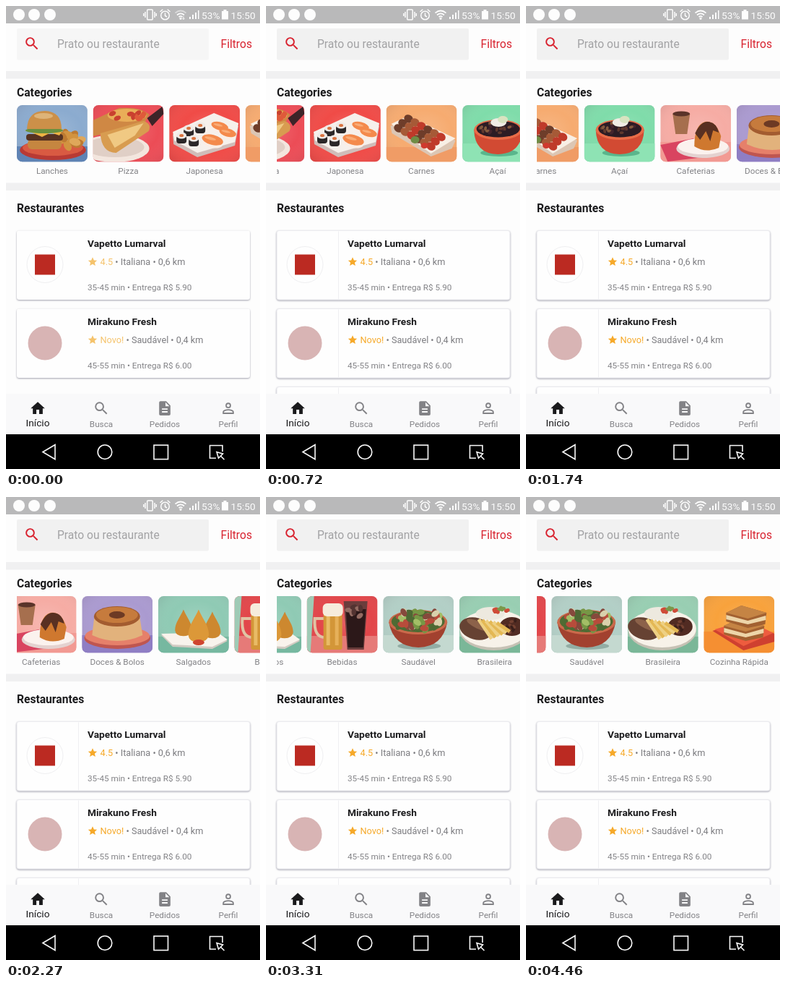
These frames come from a looping animation (352 px wide and 640 px high, 4.61 s). An HTML page:

```html
<!DOCTYPE html>
<html lang="pt-BR">
<head>
<meta charset="utf-8">
<title>Restaurantes</title>
<style>
  html, body { margin: 0; width: 100%; height: 100%; overflow: hidden; background: #fdfdfd; }
  #stage { display: block; width: 100vw; height: 100vh; font-family: Roboto, "Noto Sans", sans-serif; }
  .h { font-size: 15.64px; font-weight: 700; fill: #1c1c1e; }
  .name { font-size: 13.69px; font-weight: 700; fill: #1c1c1e; }
  .info { font-size: 12.71px; fill: #7c7c80; }
  .small { font-size: 11.73px; fill: #828286; }
  .mid { text-anchor: middle; }
  .gold { fill: #f6a92a; }
  .field { fill: #f1f1f1; }
  .band { fill: #f0f0f1; }
  .card { fill: #fefefe; stroke: #ebebef; filter: drop-shadow(0 1.5px 1px rgba(70, 70, 95, .5)); }
  .rule { stroke: #efeff1; }
  .pale .field { fill: #f6f6f6; }
  .pale .card { stroke: none; }
  .pale .rule, .pale .third { display: none; }
  .pale .gold { fill: #f5c36c; }
</style>
</head>
<body>
<svg id="stage" viewBox="0 0 352 640" preserveAspectRatio="none">
  <defs>
    <clipPath id="round"><rect width="97.8" height="78.3" rx="7.5"/></clipPath>
    <radialGradient id="glow" cx=".55" cy=".45" r=".75">
      <stop offset="0" stop-color="#fff" stop-opacity=".14"/>
      <stop offset=".5" stop-color="#fff" stop-opacity="0"/>
      <stop offset="1" stop-color="#301020" stop-opacity=".12"/>
    </radialGradient>
    <g id="lens" fill="none" stroke-width="2">
      <circle cx="9.5" cy="9.5" r="5.5"/><path d="M14 14l5.800 5.800"/>
    </g>
  </defs>
  <rect width="352" height="640" fill="#fdfdfd"/>

  <g id="status">
    <rect width="352" height="24" fill="#b9b9ba"/>
    <g fill="#fdfdfd">
      <circle cx="18" cy="12" r="8"/><circle cx="39" cy="12" r="8"/><circle cx="61" cy="12" r="8"/>
      <path d="M254 18v-3h2v3zm4 0v-6h2v6zm4 0v-9h2v9zm4 0V6h1.500v12z"/>
      <path d="M299 7h2.500V5h4v2h2.500v11.500h-9z"/>
      <g font-size="13.69"><text x="271" y="17.500">53%</text><text x="311.500" y="17.500">15:50</text></g>
    </g>
    <g fill="none" stroke="#fdfdfd" stroke-width="1.500">
      <rect x="195.700" y="5" width="7.500" height="14" rx="1"/>
      <path d="M193 8v8M206 8v8M190.800 10v4M208.200 10v4"/>
      <circle cx="220.500" cy="13" r="5.800"/>
      <path d="M220.500 9.500v4l2.500 1.500M213.500 8l3.800-3.200M227.500 8l-3.800-3.200"/>
    </g>
    <g id="wifi" fill="none" stroke="#fdfdfd" stroke-width="1.700">
      <path id="arc" d="M234.500 9.700q7.500-6.400 15 0"/>
      <path d="M237 12.500q5-4.200 10 0M239.500 15.200q2.500-2.200 5 0"/>
      <circle cx="242" cy="17.300" r=".8"/>
      <path id="traffic" d="M246 14.500v4m-1.500-1.500l1.500 1.500l1.500-1.500" stroke-width="1"/>
    </g>
  </g>

  <rect class="field" x="15" y="31" width="266" height="43.500" rx="2"/>
  <use href="#lens" transform="translate(24.200 40.200) scale(.978)" stroke="#d8222f"/>
  <text x="71" y="57.500" font-size="15.64" fill="#a2a2a4">Prato ou restaurante</text>
  <text x="297.500" y="57.500" font-size="15.64" fill="#d8222f">Filtros</text>
  <rect class="band" y="90" width="352" height="10.500"/>
  <text class="h" x="15" y="125">Categories</text>
  <svg x="15" y="137" width="337" height="104" overflow="hidden"><g id="track"></g></svg>
  <rect class="band" y="244.500" width="352" height="10.500"/>
  <text class="h" x="15" y="285">Restaurantes</text>
  <g id="list"></g>

  <rect y="536" width="352" height="56" fill="#f9f9fa"/>
  <g id="tabs"></g>

  <rect y="592" width="352" height="48" fill="#000"/>
  <g fill="none" stroke="#fafafa" stroke-width="1.600">
    <path d="M51 616.500L68 606.500V626.500Z"/>
    <circle cx="137" cy="616.500" r="9.800"/>
    <rect x="205" y="607" width="19.500" height="19.500"/>
    <path d="M300 616V607.500H282.500V625H291M292 616.500L300.500 619L294.500 625ZM297 621.500L302.500 627"/>
  </g>
</svg>
<script>
const $ = id => document.getElementById(id);
const E = (x, y, rx, ry, fill, turn = 0) =>
  `<ellipse cx="${x}" cy="${y}" rx="${rx}" ry="${ry}" fill="${fill}" transform="rotate(${turn} ${x} ${y})"/>`;
const P = (d, fill) => `<path d="${d}" fill="${fill}"/>`;
const R = (x, y, w, h, fill, r = 0) =>
  `<rect x="${x}" y="${y}" width="${w}" height="${h}" rx="${r}" fill="${fill}"/>`;

// seeded scatter of small ellipses inside an oval
function scatter(n, x, y, rx, ry, size, colors) {
  let seed = n * 7 + x, out = '';
  const rnd = () => (seed = (seed * 16807 + 11) % 2147483647) / 2147483647;
  for (let i = 0; i < 9; i++) rnd();
  for (let i = 0; i < n; i++) {
    const a = rnd() * 6.283, d = Math.sqrt(rnd());
    out += E((x + rx * d * Math.cos(a)).toFixed(1), (y + ry * d * Math.sin(a)).toFixed(1),
      size, size * .65, colors[i % colors.length], Math.round(rnd() * 180));
  }
  return out;
}

const roll = (x, y) => R(x - 7, y - 3, 14, 11, '#2b2728', 4) + E(x, y - 3, 7, 4.5, '#efeae6') + E(x, y - 3, 3, 2, '#d9733f');
const salmon = (x, y, s) => E(x, y + 5 * s, 14 * s, 6 * s, '#fbeee6', 10) + E(x, y, 15 * s, 7 * s, '#f48a4c', 14) +
  E(x - 3 * s, y - 2 * s, 8 * s, 2 * s, '#f9ad78', 14);
const drop = (x, y, s) => P(`M${x} ${y - 24 * s}C${x + 5 * s} ${y - 12 * s} ${x + 13 * s} ${y - 4 * s} ${x + 13 * s} ${y + 8 * s}` +
  `Q${x + 11 * s} ${y + 17 * s} ${x} ${y + 17 * s}Q${x - 12 * s} ${y + 17 * s} ${x - 13 * s} ${y + 8 * s}` +
  `C${x - 13 * s} ${y - 4 * s} ${x - 5 * s} ${y - 12 * s} ${x} ${y - 24 * s}Z`, s < 1 ? '#cd882f' : '#dc9838');
const skewer = (x, y) => {
  let out = '';
  for (let i = 0; i < 6; i++)
    out += E(x + i * 9, y + i * 5, 6.5, 5.5, ['#6e3d2a', '#a65a37', '#bf3a2a'][i % 3], 30);
  return out;
};

const meals = [
  ['Lanches', '#8babcf', () => R(0, 57, 98, 22, '#5f83b4') + E(50, 62, 46, 14, '#b83a34') + E(50, 59, 42, 11, '#d95a42') +
    scatter(14, 74, 48, 14, 9, 8, ['#d29340', '#bd7a32', '#dfa75a']) +
    R(15, 47, 47, 14, '#c58640', 6) + R(13, 40, 51, 9, '#573322', 4) + P('M11 35L64 33L59 42L47 38L35 44L21 38Z', '#eeb444') +
    E(38, 35, 26, 4, '#69903f') + P('M14 33Q15 8 39 8Q62 9 62 33Z', '#cc9049') + E(37, 15, 13, 4, '#deb478')],
  ['Pizza', '#ec4c56', () => E(30, 60, 48, 19, '#f3e6de') + E(30, 58, 41, 14, '#e0cfc6') +
    P('M0 21L36 4Q66 2 78 13L70 27L0 43Z', '#cf8844') + E(47, 14, 27, 9, '#e9ad58') +
    scatter(10, 47, 15, 24, 7, 5, ['#c9402f', '#df5a3a']) +
    P('M10 39L70 22Q82 26 77 36L32 66Q12 66 10 39Z', '#d89c50') + P('M20 41L70 25L58 42L30 59Z', '#f0c983') +
    P('M75 18L96 2L98 12L82 29Z', '#3d2428')],
  ['Japonesa', '#f04b47', () => P('M5 41L62 15L96 29L91 56L39 72L6 54Z', '#d0bdb9') + P('M5 37L62 11L96 25L91 51L39 66L7 49Z', '#f6f0eb') +
    roll(27, 35) + roll(43, 31) + roll(17, 45) + roll(34, 49) + salmon(70, 29, .8) + salmon(81, 38, .8) + salmon(60, 48, 1)],
  ['Carnes', '#f6ab70', () => R(0, 58, 98, 21, '#f09c66') + P('M6 29L30 17L96 49L91 60L62 71L8 39Z', '#dcc6b4') + P('M7 26L30 15L96 46L62 67Z', '#f8efe5') +
    skewer(31, 19) + skewer(23, 25) + skewer(17, 32) + E(40, 48, 6, 5, '#6f8c45') + E(53, 56, 5, 4, '#cf3a2e')],
  ['Açaí', '#7fdcaa', () => R(0, 53, 98, 26, '#8ee3b4') + E(51, 66, 26, 5, '#5ab68c') +
    P('M16 34Q17 67 49 68Q82 67 83 34Z', '#d24a33') + E(49.5, 34, 33.5, 14, '#e86c48') + E(49.5, 33, 30, 11.5, '#2c1c24') +
    scatter(22, 47, 32, 24, 7, 3, ['#60392e', '#84593d', '#44252d']) + E(50, 24, 11, 6, '#f0ece4') + E(56, 20, 7, 5, '#d8e3c0')],
  ['Cafeterias', '#f6aca4', () => R(0, 51, 98, 28, '#f29a93') + P('M0 55L46 46L60 72L10 78Z', '#d94460') + E(59, 60, 37, 13, '#e4d2d0') + E(59, 57, 35, 11, '#fbf2ee') +
    P('M17 12H41L37 40H21Z', '#a66f4e') + E(29, 12, 12, 3.5, '#5a3329') +
    P('M47 57Q47 27 62 23Q77 21 84 43L81 59Q63 67 47 57Z', '#cf782f') + P('M48 39Q56 22 66 23Q78 24 81 38L73 35L69 50L63 36L55 48Z', '#593022')],
  ['Doces & Bolos', '#aa9ad0', () => R(0, 54, 98, 25, '#8f7ec4') + E(49, 58, 46, 15, '#bf5650') + E(49, 55, 45, 13, '#e6806a') +
    P('M17 29L14 54Q49 70 84 54L80 29Z', '#e2b27c') + E(48.5, 28, 32, 14, '#a35c30') + E(48.5, 26, 29, 11, '#c67b3d') + E(48.5, 26, 11, 5, '#6d3a24')],
  ['Salgados', '#8fcab4', () => R(0, 56, 98, 23, '#76b8a0') + P('M4 54L82 52L96 62L75 73L20 70Z', '#d2cbc2') + P('M4 52L82 50L96 60L75 70L20 67Z', '#f8f3ec') +
    drop(35, 40, .9) + drop(75, 43, .9) + drop(56, 45, 1.1) + E(56, 64, 8, 4, '#cf442f')],
  ['Bebidas', '#e2464a', () => R(0, 55, 98, 24, '#e67a78') + P('M0 0H10L5 78H0Z', '#9fcbb6') +
    '<path d="M26 31H11Q9 58 26 57" fill="none" stroke="#e0c3a4" stroke-width="4"/>' +
    R(23, 21, 26, 53, '#d39638', 3) + R(27, 28, 5, 40, '#e9bb66') + R(39, 28, 5, 40, '#e6b05a') + R(22, 10, 28, 18, '#f6ecdc', 6) +
    P('M51 7H84L79 74H56Z', '#6b3d3c') + P('M54 18H82L78 71H57Z', '#2c1819') + scatter(8, 68, 21, 11, 8, 5, ['#946b62', '#533331'])],
  ['Saudável', '#b2cfc6', () => R(0, 54, 98, 25, '#c4d9d0') + E(50, 69, 30, 5, '#92ada4') + P('M8 36Q14 70 49 71Q83 70 89 36Z', '#a2412f') +
    E(48.5, 36, 40.5, 17, '#cb6a4b') + E(48.5, 35, 37, 15, '#4f6b33') +
    scatter(42, 48, 33, 33, 14, 6, ['#769745', '#a3be66', '#d9d1ac', '#4d6934', '#b84c3b', '#86493c'])],
  ['Brasileira', '#98ceb2', () => R(0, 56, 98, 23, '#7ab798') + E(48, 48, 47, 27, '#c6c1b4') + E(48, 45, 47, 26, '#f7f2e9') +
    E(43, 24, 20, 9, '#ede9df') + scatter(7, 57, 20, 10, 4, 4, ['#cf4b37', '#7a994a']) + E(73, 42, 17, 13, '#512b22') +
    scatter(12, 73, 42, 13, 9, 3, ['#734131', '#3a1f1a']) + E(23, 45, 23, 15, '#664233', 15) + E(26, 40, 17, 5, '#8c624a', 25) +
    [0, 1, 2, 3, 4, 5].map(i => `<path d="M${27 + i * 5} ${32 + i}L${45 + i * 5} ${59 - i * 2}" stroke="${i % 2 ? '#e4b854' : '#eed083'}" stroke-width="5"/>`).join('')],
  ['Cozinha Rápida', '#f8a23c', () => R(0, 49, 98, 30, '#f58f32') + P('M12 48L59 34L98 52V63L55 75Z', '#cf4030') + P('M15 46L60 33L96 51L55 69Z', '#ee5c3e') +
    [[28, 41], [31, 23]].map(([x, y]) => P(`M${x} ${y}L${x + 21} ${y - 10}L${x + 56} ${y}L${x + 54} ${y + 16}L${x + 30} ${y + 21}L${x} ${y + 12}Z`, '#a26131') +
      P(`M${x} ${y + 3}L${x + 30} ${y + 11}L${x + 55} ${y + 4}V${y + 10}L${x + 30} ${y + 16}L${x} ${y + 9}Z`, '#edd5a8') +
      P(`M${x} ${y}L${x + 21} ${y - 10}L${x + 56} ${y}L${x + 30} ${y + 8}Z`, '#c58444')).join('')]
];

const pitch = 105.6;
$('track').innerHTML = meals.map(([label, back, draw], i) => `<g transform="translate(${i * pitch} 0)">
  <g clip-path="url(#round)">${R(0, 0, 98, 79, back)}${R(0, 0, 98, 79, 'url(#glow)')}${draw()}</g>
  <text class="small mid" x="48.900" y="94.500">${label}</text></g>`).join('');

const star = 'M0-6.200L1.900-2L6.200-1.700L2.900 1.200L3.900 5.600L0 3.200L-3.900 5.600L-2.900 1.200L-6.200-1.700L-1.900-2Z';
const places = [
  ['Vapetto Lumarval', '4.5', 'Italiana • 0,6 km', '35-45 min • Entrega R$ 5.90',
    '<circle cx="39" cy="47" r="25" fill="none" stroke="#efeff1"/>' + R(25, 33, 28, 28, '#bb2a22')],
  ['Mirakuno Fresh', 'Novo!', 'Saudável • 0,4 km', '45-55 min • Entrega R$ 6.00', E(39, 47.5, 23.5, 23.5, '#d8b4b4')]
];
const shell = '<rect class="card" width="323" height="95.500" rx="3"/><path class="rule" d="M85.500 1V95"/>';
$('list').innerHTML = places.map(([name, score, kind, fee, mark], i) => `<g transform="translate(15 ${310.5 + i * 108})">
  ${shell}${mark}<text class="name" x="98" y="22">${name}</text>
  <path class="gold" d="${star}" transform="translate(105 43)"/>
  <text class="info" x="115.500" y="47"><tspan class="gold">${score}</tspan> • ${kind}</text>
  <text class="small" x="98" y="82">${fee}</text></g>`).join('') +
  `<g class="third" transform="translate(15 526.500)">${shell}</g>`;

const gray = '#828286';
const tabs = [
  ['Início', '<path d="M10 20v-6h4v6h5v-8h3L12 3 2 12h3v8z"/>'],
  ['Busca', `<use href="#lens" stroke="${gray}"/>`],
  ['Pedidos', '<path fill-rule="evenodd" d="M14 2H6c-1.100 0-2 .9-2 2v16c0 1.100.9 2 2 2h12c1.100 0 2-.9 2-2V8l-6-6zm2 16H8v-2h8v2zm0-4H8v-2h8v2zm-3-5V3.500L18.500 9H13z"/>'],
  ['Perfil', `<g fill="none" stroke="${gray}" stroke-width="1.900"><circle cx="12" cy="8" r="3"/><path d="M5 19v-2c0-2 4.500-3 7-3s7 1 7 3v2z"/></g>`]
];
$('tabs').innerHTML = tabs.map(([label, icon], i) => {
  const x = 44 + i * 88, on = i === 0;
  return `<g fill="${on ? '#1a1a1c' : gray}"><g transform="translate(${x - 11.7} 544.400) scale(.978)">${icon}</g>
    <text class="mid" x="${x}" y="${on ? 581 : 582}" font-size="${on ? 13.69 : 11.73}">${label}</text></g>`;
}).join('');

// scroll offset over time, joined by a monotone cubic
const loop = 4610;
const path = [[0, 0], [720, 165], [1340, 288.7], [1740, 356.5], [2670, 681], [3310, 803], [4190, 930.2]];
const speed = path.slice(1).map(([t, x], i) => (x - path[i][1]) / (t - path[i][0]));
const slope = path.map((_, i) => i && i < speed.length ? 2 * speed[i - 1] * speed[i] / (speed[i - 1] + speed[i]) : 0);

function scrollAt(t) {
  const i = path.findIndex(p => p[0] > t) - 1;
  if (i < 0) return path[path.length - 1][1];
  const [t0, a] = path[i], [t1, b] = path[i + 1];
  const d = t1 - t0, u = (t - t0) / d, v = 1 - u;
  return a * v * v * (1 + 2 * u) + b * u * u * (3 - 2 * u) + d * u * v * (slope[i] * v - slope[i + 1] * u);
}

const busy = [[0, 600], [2400, 2750], [3600, 4460]];
function render(t) {
  $('track').setAttribute('transform', `translate(${-scrollAt(t).toFixed(2)} 0)`);
  const active = busy.some(([a, b]) => t >= a && t < b);
  $('traffic').setAttribute('visibility', active ? 'visible' : 'hidden');
  $('arc').setAttribute('opacity', active ? .5 : 1);
  $('stage').classList.toggle('pale', t < 20);
}

const start = performance.now();
function tick() {
  render((performance.now() - start) % loop);
  requestAnimationFrame(tick);
}
tick();
</script>
</body>
</html>
```
